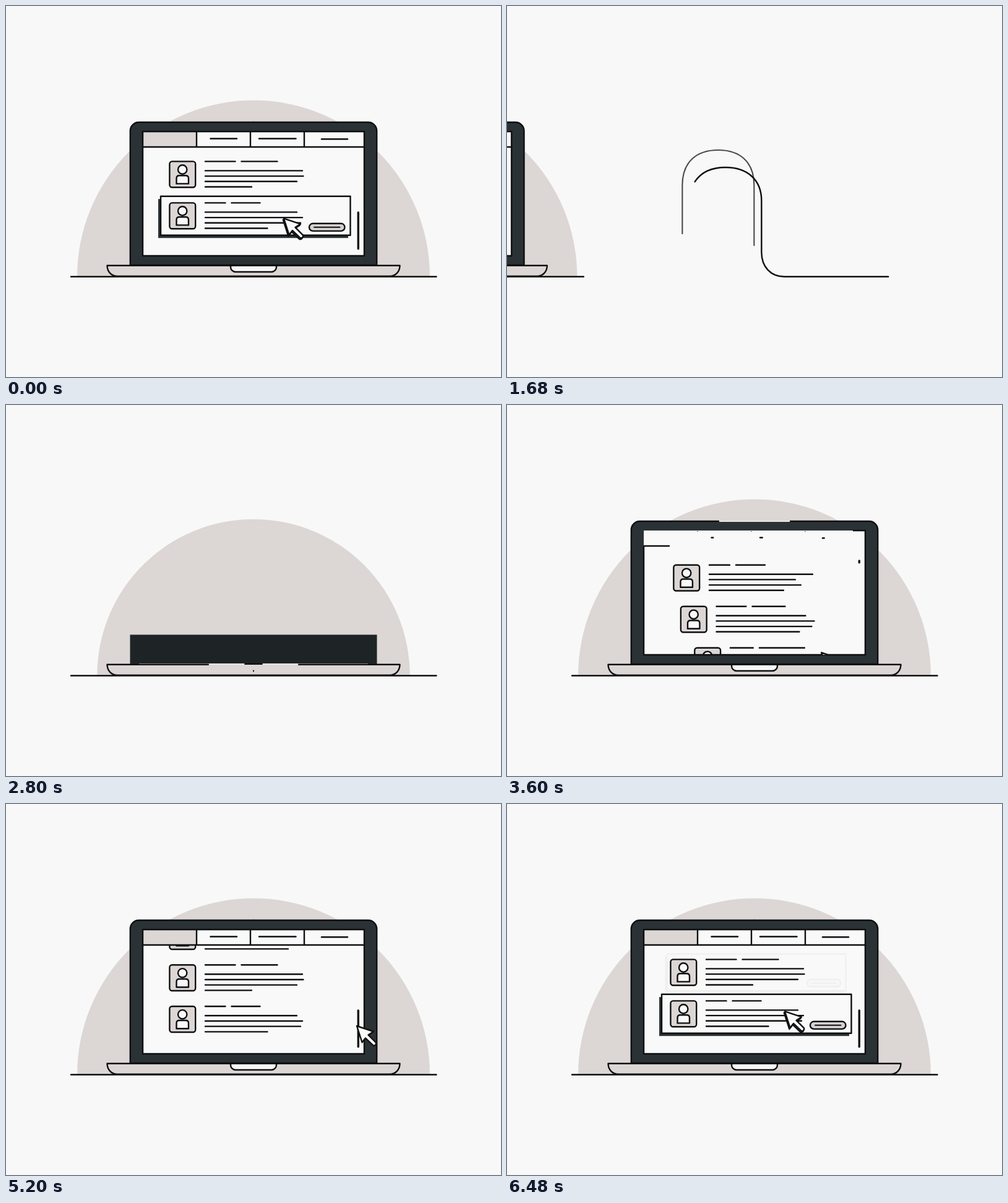
An HTML page for the animation above (6520 ms loop, 800 by 600 pixels).

```html
<!DOCTYPE html>
<html lang="en">
<head>
<meta charset="utf-8">
<title>Laptop list loop</title>
<style>
html, body { margin: 0; width: 100%; height: 100%; overflow: hidden; background: #f8f8f8; }
svg { display: block; width: 800px; height: 600px; }
.ink { fill: none; stroke: #0e0f11; stroke-width: 2.4; stroke-linejoin: round; }
.round { stroke-linecap: round; }
</style>
</head>
<body>
<svg id="stage" viewBox="0 0 800 600">
  <defs>
    <clipPath id="lidClip"><rect id="lidRect" x="199" width="402"/></clipPath>
    <clipPath id="screenClip"><rect id="screenRect" x="221" width="358"/></clipPath>
    <clipPath id="listClip"><rect x="222" y="229" width="356" height="174.5"/></clipPath>
    <clipPath id="cursorClip"><rect width="800" height="404"/></clipPath>
  </defs>
  <g id="scene">
    <path id="dome" fill="#dcd7d4"/>
    <g clip-path="url(#lidClip)">
      <path id="lid" d="M200.5 419V202a14 14 0 0 1 14-14H585.5a14 14 0 0 1 14 14V419Z"/>
      <path d="M215 188H585M215 419H585" stroke="#f0edec" stroke-width="2"/>
    </g>
    <g id="lidLine"></g>
    <g clip-path="url(#screenClip)">
      <rect x="221" y="203" width="358" height="201" fill="#f9f9f9"/>
      <g id="list" clip-path="url(#listClip)"></g>
      <rect id="tab" x="221" y="203" height="25" fill="#dcd7d4"/>
    </g>
    <g id="header"></g>
    <path id="bar" class="ink round" style="stroke-width:3.4"/>
    <path id="baseFill" d="M163.5 420H636.5C636.5 429 630 437 620 437H180C170 437 163.5 429 163.5 420Z" fill="#dcd7d4"/>
    <path id="notchFill" d="M363 419.5V422a8 8 0 0 0 8 8H429a8 8 0 0 0 8-8V419.5Z" fill="#f8f8f8"/>
    <g id="baseLine"></g>
    <path id="ground" class="ink round" d="M105 437.7H695.5"/>
    <g clip-path="url(#cursorClip)">
      <g id="cursor">
        <use id="cursorShade" href="#arrow" transform="translate(-1.2 2)"/>
        <path id="arrow" class="ink" style="fill:#f9f9f9" d="M0 0L27 9L18.5 14.5L31 27Q32 30 29 31.5Q27 32 26 31L14 19.5L8.5 26.5Z"/>
      </g>
    </g>
  </g>
  <g id="trails">
    <path id="echo" class="ink round" style="stroke:#4c4849;stroke-width:2.1"
      d="M640 452H812C840 452 855 435 855 409V290C855 252 878 233 913 233S971 252 971 290V409C971 435 986 452 1014 452H1700"/>
    <path id="trail" class="ink round"
      d="M640 438H824C850 438 867 422 867 400V315C867 281 890 261 925 261S983 281 983 315V398C983 422 998 437.7 1020 437.7H1746"/>
  </g>
</svg>
<script>
const LOOP = 6520, TRAVEL = 1050, SCROLL = 208.3;
const $ = id => document.getElementById(id);
const set = (el, attrs) => { for (const k in attrs) el.setAttribute(k, attrs[k]); };
function add(parent, tag, attrs) {
  const el = document.createElementNS('http://www.w3.org/2000/svg', tag);
  set(el, attrs);
  parent.appendChild(el);
  return el;
}

const part = (t, a, b) => Math.min(1, Math.max(0, (t - a) / (b - a)));
const inOut = (u, p = 2) => u < .5 ? .5 * (2 * u) ** p : 1 - .5 * (2 - 2 * u) ** p;
const ease = (t, a, b) => inOut(part(t, a, b));
const out = (t, a, b) => 1 - (1 - part(t, a, b)) ** 3;
const mix = (a, b, u) => a + (b - a) * u;

// Smooth curve through [time, value] pairs
function spline(keys, t) {
  const n = keys.length - 1;
  if (t <= keys[0][0]) return keys[0][1];
  if (t >= keys[n][0]) return keys[n][1];
  let i = 0;
  while (t > keys[i + 1][0]) i++;
  const slope = k => k < 1 || k >= n ? 0 :
    (keys[k + 1][1] - keys[k - 1][1]) / (keys[k + 1][0] - keys[k - 1][0]);
  const [t0, v0] = keys[i], [t1, v1] = keys[i + 1], d = t1 - t0, u = (t - t0) / d;
  return (1 + 2 * u) * (1 - u) ** 2 * v0 + u * (1 - u) ** 2 * d * slope(i)
    + u * u * (3 - 2 * u) * v1 + u * u * (u - 1) * d * slope(i + 1);
}

// Strokes that draw themselves on: [path, start, end]
const strokes = [];
function stroke(parent, d, start, end, cls = 'ink', transform = '') {
  const el = add(parent, 'path', { d, class: cls, pathLength: 1, transform });
  strokes.push([el, start, end]);
}
function mirrored(parent, d, start, end) {
  stroke(parent, d, start, end);
  stroke(parent, d, start, end, 'ink', 'translate(800 0) scale(-1 1)');
}

mirrored($('lidLine'), 'M400 419H200.8V202a14 14 0 0 1 14-14H400.5', 2673, 3855);
mirrored($('baseLine'), 'M400 437H180C170 437 163.5 429 163.5 419.7H400.5', 2380, 2960);
mirrored($('baseLine'), 'M400 430H371a8 8 0 0 1-8-8V419.5', 2755, 3200);
const header = $('header');
stroke(header, 'M221 228V404H579V203H221V228', 3100, 3939);
stroke(header, 'M221 228H579', 3480, 3980);
for (const x of [308, 395, 482]) stroke(header, `M${x} 204V228`, 3560, 3920);
for (const [x, w, y] of [[330.5, 42.5, 214.5], [409, 59.5, 214.5], [510, 42, 215.3]])
  stroke(header, `M${x} ${y}h${w}`, 3530, 3930, 'ink round');

// Each row: two title widths, then four text widths
const rows = [
  [34, 48, 168, 140, 149, 121],
  [49, 54, 145, 159, 155, 135],
  [38, 74, 150, 158, 146, 135],
  [49.5, 59, 158, 159.5, 149, 76],
  [33.5, 47, 149, 158, 155, 101.5]
];

function makeCard(widths, i) {
  const root = add($('list'), 'g', {});
  let glow = null;
  if (i > 2) {
    glow = add(root, 'g', {});
    add(glow, 'rect', { x: 246, y: -6, width: 307, height: 63, fill: '#2b3235' });
    add(glow, 'rect', { x: 250, y: -10.5, width: 306.5, height: 63, class: 'ink', style: 'fill:#f9f9f9' });
    add(glow, 'rect', { x: 490, y: 33.5, width: 57.5, height: 12.2, rx: 6.1, class: 'ink', style: 'fill:#d5d1d0' });
    add(glow, 'path', { d: 'M498 39.6H539.5', class: 'ink round', style: 'stroke-width:2' });
  }
  add(root, 'rect', { x: 264.4, y: .2, width: 41.8, height: 41.8, rx: 4, class: 'ink', style: 'fill:#dcd7d4' });
  add(root, 'circle', { cx: 285.2, cy: 13.3, r: 7.2, class: 'ink', style: 'fill:#f9f9f9' });
  add(root, 'path', { d: 'M275.5 36.2V27.5q0-4.5 4.5-4.5h10.5q4.5 0 4.5 4.5v8.7Z', class: 'ink', style: 'fill:#f9f9f9' });
  const [a, b, ...text] = widths;
  let d = `M322 .2h${a - 1}M${331 + a} .2h${b - 1}`;
  text.forEach((w, k) => d += `M322 ${15.2 + k * 8.7}h${w - 1}`);
  add(root, 'path', { d, class: 'ink round' });
  return { root, glow };
}
const cards = rows.map(makeCard);

function showGlow(glow, amount) {
  const s = mix(.94, 1, amount);
  set(glow, { opacity: amount, transform: `translate(403.5 21) scale(${s}) translate(-403.5 -21)` });
}

function trim(el, from, to) {
  el.style.display = to - from > .5 ? '' : 'none';
  set(el, { 'stroke-dasharray': `${Math.max(0, to - from)} 5000`, 'stroke-dashoffset': -from });
}

const total = $('trail').getTotalLength();
const trailHead = [[960, 56], [1120, 197], [1680, 823], [2080, 1230], [2472, total]];
const trailTail = [[1000, 56], [1120, 70], [1680, 365], [2080, 600], [2472, total - 591]];
const echoHead = [[980, 70], [1120, 163], [1680, 641], [2080, 1000], [2400, 1150]];
const echoTail = [[980, 70], [1120, 78], [1680, 281], [2080, 740], [2400, 1150]];

function drawTrails(t, camera) {
  const on = t > 960 && t < 2472;
  $('trails').style.display = on ? '' : 'none';
  if (!on) return;
  set($('trails'), { transform: `translate(${-camera} 0)` });
  trim($('trail'), spline(trailTail, t), spline(trailHead, t));
  trim($('echo'), spline(echoTail, t), spline(echoHead, t));
}

function drawLaptop(c) {
  const r = 285 * out(c, 2140, 3420);
  set($('dome'), { d: `M${400 - r} 437.5A${r} ${r} 0 0 1 ${400 + r} 437.5Z` });

  const rise = 232 * ease(c, 2640, 3140);
  set($('lidRect'), { y: 419.5 - rise, height: rise });
  const tone = ease(c, 2800, 3200);
  const rgb = [[30, 43], [36, 50], [38, 53]].map(([a, b]) => Math.round(mix(a, b, tone)));
  set($('lid'), { fill: `rgb(${rgb})` });
  const open = 201 * ease(c, 2860, 3300);
  set($('screenRect'), { y: 404 - open, height: open });

  const base = ease(c, 2380, 2800);
  set($('baseFill'), { transform: `translate(400 0) scale(${base} 1) translate(-400 0)` });
  set($('notchFill'), { opacity: ease(c, 2820, 3200) });
  set($('tab'), { width: 87 * ease(c, 3590, 3950) });

  for (const [el, a, b] of strokes) {
    const p = ease(c, a, b);
    el.style.display = p > 0 ? '' : 'none';
    set(el, { 'stroke-dasharray': p < 1 ? `${p} 2` : 'none' });
  }

  const scroll = SCROLL * ease(c, 4240, 5365);
  cards.forEach(({ root }, i) => {
    const start = 3228 + 63 * i;
    const x = 300 * (1 - out(c, start, start + 500));
    set(root, { transform: `translate(${x} ${258.5 + 67 * i - scroll})` });
  });
  showGlow(cards[3].glow, ease(c, 5620, 5800) * (1 - ease(c, 6220, 6520)));
  showGlow(cards[4].glow, ease(c, 6220, 6420));

  const grow = ease(c, 3540, 3940), top = 252 + 82 * ease(c, 4240, 5190);
  $('bar').style.display = grow > 0 ? '' : 'none';
  set($('bar'), { d: `M569.3 ${top}v${58.5 * grow}` });
}

// Each step adds its own eased share of the way
function drawCursor(c) {
  const x = 496.5 + 70.5 * ease(c, 3400, 4100) - 118 * ease(c, 5360, 5900) + 65.5 * ease(c, 6540, 7120);
  const y = 425 - 149 * ease(c, 3400, 4100) + 83 * ease(c, 4240, 5190)
    - 76 * ease(c, 5360, 5900) + 71 * ease(c, 6200, 6640) + 5 * ease(c, 6640, 7120);
  set($('cursor'), { transform: `translate(${x} ${y})` });
  set($('cursorShade'), { opacity: ease(c, 5620, 5800) });
}

function draw(now) {
  const t = now % LOOP;
  const leaving = t < 2000;
  const clock = leaving ? t + LOOP : t;
  const camera = TRAVEL * inOut(part(t, 830, 2472), 2.5);
  set($('scene'), { transform: `translate(${leaving ? -camera : TRAVEL - camera} 0)` });
  $('ground').style.display = leaving || t >= 2472 ? '' : 'none';
  drawLaptop(clock);
  drawCursor(clock);
  drawTrails(t, camera);
}

const began = performance.now();
function tick() {
  draw(performance.now() - began);
  requestAnimationFrame(tick);
}
tick();
</script>
</body>
</html>
```
